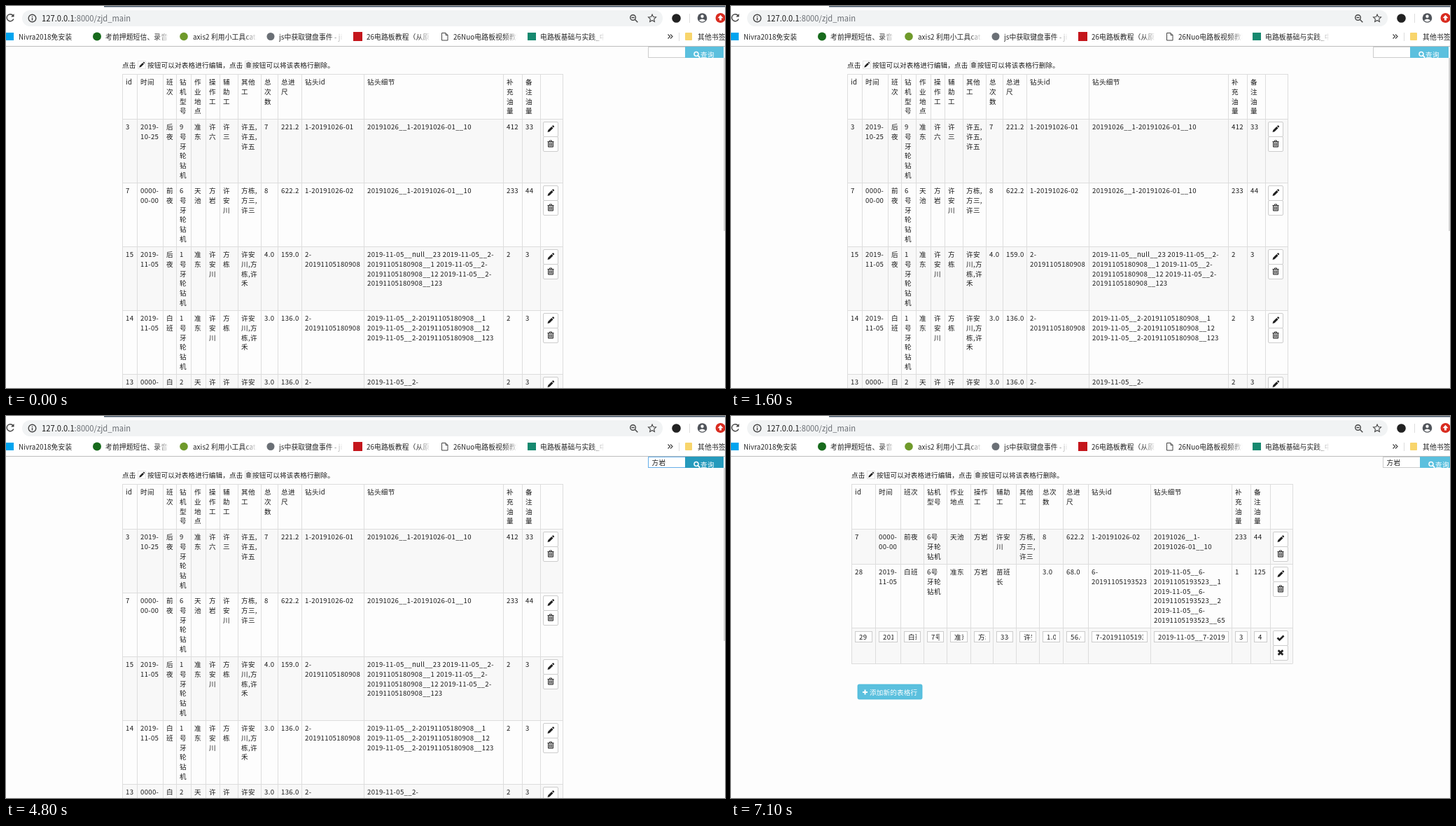
These frames come from a looping animation (1027x545 px, 8000 ms). An HTML page:

```html
<!DOCTYPE html>
<html lang="zh-CN">
<head>
<meta charset="utf-8">
<title>zjd_main</title>
<style>
html, body { margin: 0; width: 100%; height: 100%; overflow: hidden; background: #fdfdfd; }
svg { display: block; }
#stage { position: absolute; left: 0; top: 0; }
text {
  font: 9.6px "Noto Sans CJK SC", "Noto Sans CJK", "Noto Sans", sans-serif;
  letter-spacing: .33px; fill: #1a1a1a; white-space: pre;
}
.url { font-size: 11.2px; letter-spacing: 0; }
.mark { font-size: 9.8px; letter-spacing: .1px; fill: #222; }
.hint { letter-spacing: .15px; }
.white, .white tspan { fill: #fff; }
.dim { fill: #6b6f74; }
.ime { fill: #1a6fc0; }
.line { fill: none; stroke: #444; stroke-width: 1.4; }
.grid { fill: none; stroke: #ddd; }
.box { fill: #fff; stroke: #ccc; }
</style>
</head>
<body>
<svg id="stage" width="1027" height="545" viewBox="0 0 1027 545"></svg>
<script>
const LOOP = 8000, LH = 13.75;
let css = '', count = 0;

// Group that is visible only in the given [from, to) spans, in ms.
function during(spans, body) {
  const name = 'k' + count++;
  const at = (ms, on) => `${ms / LOOP * 100}%{visibility:${on ? 'visible' : 'hidden'}}`;
  let keys = spans[0][0] > 0 ? at(0, false) : '';
  for (const [from, to] of spans) keys += at(from, true) + at(to, to === LOOP);
  css += `@keyframes ${name}{${keys}}.${name}{animation:${name} ${LOOP}ms step-end infinite}`;
  return `<g class="${name}">${body}</g>`;
}

const rect = (x, y, w, h, attrs) => `<rect x="${x}" y="${y}" width="${w}" height="${h}" ${attrs}/>`;
const disc = (x, y, r, attrs) => `<circle cx="${x}" cy="${y}" r="${r}" ${attrs}/>`;
const path = (d, attrs) => `<path d="${d}" ${attrs}/>`;
const text = (x, y, s, cls = '') => `<text x="${x}" y="${y}" class="${cls}">${s}</text>`;
const move = (x, y, body, scale = 1) => `<g transform="translate(${x} ${y}) scale(${scale})">${body}</g>`;
const lines = (x, y, s) => s.split('|').map((t, i) => t && text(x, y + i * LH, t)).join('');

const pencil = (x, y, scale = .9) => move(x, y,
  path('M-5 5l.9-3.3 5.6-5.6 2.4 2.4-5.6 5.6zM2.2-4.5l1-1q.7-.5 1.3 0l1 1q.5.7 0 1.3l-1 1z', 'fill="#222"'), scale);
const trash = (x, y, scale = 1) => move(x, y,
  path('M-3.5-3h7v8h-7z', 'fill="#bbb"') +
  path('M-4.5-3h9M-1.5-3v-1.6h3V-3M-3.5-3v7.5h7V-3M-1.2-1v4M1.2-1v4', 'fill="none" stroke="#333"'), scale);
const tick = (x, y) => move(x, y, path('M-4.5 0l3 3 6-6', 'fill="none" stroke="#222" stroke-width="2.6"'));
const cross = (x, y) => move(x, y, path('M-3.3-3.3l6.6 6.6M3.3-3.3l-6.6 6.6', 'stroke="#222" stroke-width="2.8"'));
const lens = (x, y, color) => move(x, y,
  disc(-1, -1, 3, `fill="none" stroke="${color}" stroke-width="1.5"`) +
  path('M1.2 1.2l3 3', `stroke="${color}" stroke-width="1.8"`));

function button(x, y, icon, fill = '#fff', stroke = '#ccc') {
  return rect(x + .5, y + .5, 21, 21, `fill="${fill}" stroke="${stroke}" rx="1.5"`) + icon(x + 11, y + 10.5);
}

// rows: [top, cells]; the first row is the header.
function table(cols, rows, bottom) {
  const left = cols[0], right = cols[cols.length - 1];
  let fills = '', grid = '', words = '', tools = '';
  rows.forEach(([top, cells], i) => {
    const end = i + 1 < rows.length ? rows[i + 1][0] : bottom;
    if (i % 2) fills += rect(left, top, right - left, end - top, 'fill="#f8f8f8"');
    grid += `M${left} ${top + .5}H${right + .5}`;
    cells.forEach((s, c) => words += lines(cols[c] + 5, top + 15, s));
    if (i && cells.length) {
      const x = cols[14] + 4;
      tools += button(x, top + 4, pencil) + button(x, top + 25, trash);
    }
  });
  grid += `M${left} ${bottom + .5}H${right + .5}`;
  for (const x of cols) grid += `M${x + .5} ${rows[0][0]}V${bottom}`;
  return fills + path(grid, 'class="grid"') + words + tools;
}

const hint = x => move(x, 0,
  text(0, 88, '点击', 'hint') + rect(22.5, 78.5, 11, 11, 'fill="none" stroke="#e4e4e4"') + pencil(28, 84, .75) +
  text(36, 88, '按钮可以对表格进行编辑，点击', 'hint') + rect(175.5, 78.5, 10, 11, 'fill="none" stroke="#ddd"') +
  trash(180.5, 84, .75) + text(186, 88, '按钮可以将该表格行删除。', 'hint'));

const addRow = y => rect(181, y, 92, 21, 'fill="#5bc0de" stroke="#46b8da" stroke-width=".8" rx="2"') +
  path(`M188 ${y + 11}h7m-3.5-3.5v7`, 'stroke="#fff" stroke-width="2"') +
  text(198, y + 14.5, '添加新的表格行', 'hint white');

const field = x => rect(x + .5, 58.5, 53, 15, 'class="box"');
const query = (x, color) => rect(x, 58, 55, 16, `fill="${color}"`) +
  lens(x + 17, 69.5, '#fff') + text(x + 22, 73, '查询', 'white');

// Table content
const user = '方岩', chief = '许安川';
const down = s => [...s].join('|');
const heads = ['id', '时间', '班次', '钻机型号', '作业地点', '操作工', '辅助工', '其他工',
  '总次数', '总进尺', '钻头id', '钻头细节', '补充油量', '备注油量'];
const tall = heads.map((h, i) => [2, 3, 4, 5, 6, 8, 12, 13].includes(i) ? down(h) :
  i === 7 || i === 9 ? h.slice(0, 2) + '|' + h[2] : h);
const wide = heads.map((h, i) => i < 3 || i === 10 || i === 11 ? h :
  i > 11 ? down(h) : h.slice(0, 2) + '|' + h.slice(2));
const day = '2019-|11-05', noDay = '0000-|00-00', bit = '2-|20191105180908';
const crew = '许安|川,方|栋,许|禾', trio = '方栋,|方三,|许三';
const drill = n => n + '|号|牙|轮|钻|机', rig = n => n + '号|牙|轮|钻|机', rig3 = n => n + '号|牙轮|钻机';
const shot = '20191026__1-20191026-01__10', head = '2019-11-05__2-', tail = '20191105180908__';
const six = '2019-11-05__6-', sixTail = '20191105193523__';

const fullTable = table(
  [166, 187, 224, 243, 264, 285, 305, 331, 364, 388, 422, 511, 710, 737, 763, 795],
  [[97, tall],
   [161, ['3', '2019-|10-25', '后|夜', drill(9), '准|东', '许|六', '许|三', '许五,|许五,|许五', '7', '221.2', '1-20191026-01', shot, '412', '33']],
   [252, ['7', noDay, '前|夜', drill(6), '天|池', down(user), down(chief), trio, '8', '622.2', '1-20191026-02', shot, '233', '44']],
   [343, ['15', day, '后|夜', drill(1), '准|东', down(chief), '方|栋', crew, '4.0', '159.0', bit,
     `2019-11-05__null__23 ${head}|${tail}1 ${head}|${tail}12 ${head}|${tail}123`, '2', '3']],
   [434, ['14', day, '白|班', drill(1), '准|东', down(chief), '方|栋', crew, '3.0', '136.0', bit,
     `${head}${tail}1|${head}${tail}12|${head}${tail}123`, '2', '3']],
   [525, ['13', noDay, '白|班', drill(2), '天|池', down(chief), down(chief), crew, '3.0', '136.0', bit, `${head}|${tail}1`, '2', '3']]],
  616);

const emptyTable = table(
  [172, 195, 228, 261, 314, 367, 410, 453, 496, 539, 582, 628, 681, 734, 787, 802], [[97, heads]], 119);

const foundTable = table(
  [172, 194, 230, 249, 276, 299, 319, 345, 381, 404, 439, 528, 717, 743, 770, 802],
  [[97, tall],
   [161, ['7', noDay, '前|夜', rig(6), '天|池', down(user), down(chief), trio, '8', '622.2', '1-20191026-02', shot, '233', '44']],
   [238, ['28', day, '白|班', rig(6), '准|东', down(user), '苗|班|长', '', '3.0', '68.0', '6-|20191105193523',
     `${six}${sixTail}1|${six}${sixTail}2|${six}${sixTail}65`, '1', '125']],
   [316, ['29', day, '白|班', rig(7), '准|东', down(user), '334', crew, '1.0', '56.0', '7-|20191105193640', '2019-11-05__7-20191105193640__56', '3', '4']]],
  393);

const editCols = [172, 206, 242, 275, 308, 342, 374, 407, 440, 474, 510, 599, 715, 742, 770, 802];
const editTable = table(editCols,
  [[97, wide],
   [161, ['7', noDay, '前夜', rig3(6), '天池', user, '许安|川', trio, '8', '622.2', '1-20191026-02', '20191026__1-|20191026-01__10', '233', '44']],
   [211, ['28', day, '白班', rig3(6), '准东', user, '苗班|长', '', '3.0', '68.0', '6-|20191105193523',
     ['1', '2', '65'].map(n => `${six}|${sixTail}${n}`).join('|'), '1', '125']],
   [302, []]], 353);
const editFields = ['29', '2019-11-05', '白班', '7号牙轮钻机', '准东', user, '334', chief + ',方栋,许禾', '1.0', '56.0',
  '7-20191105193640', '2019-11-05__7-20191105193640__56', '3', '4'].map((s, i) => {
    const x = editCols[i] + 5, w = editCols[i + 1] - x - 5;
    return rect(x + .5, 307.5, w, 15, 'class="box"') +
      `<svg x="${x + 6}" y="307" width="${w - 11}" height="16">${text(0, 11.5, s)}</svg>`;
  }).join('');

// Browser bars
const urlText = (host, rest) =>
  `<text x="51" y="22" class="url ${host}">127.0.0.1<tspan class="${rest}">:8000/zjd_main</tspan></text>`;
const marks = [
  [18, 'Nivra2018免安装'], [142, '考前押题短信、录音'], [267, 'axis2 利用小工具cat.'], [390, 'js中获取键盘事件 - ji'],
  [515, '26电路板教程（从原'], [639, '26Nuo电路板视频教程'], [763, '电路板基础与实践_中']
].map(([x, s]) => `<svg x="${x}" y="34" width="93" height="20">${text(0, 13.5, s, 'mark')}</svg>` +
  rect(x + 72, 35, 22, 18, 'fill="url(#fade)"')).join('');

const bars = rect(0, 0, 1027, 57, 'fill="#fff"') + rect(140, 0, 887, 1.5, 'fill="#4a5a6c"') +
  rect(0, 57, 1027, 1, 'fill="#bdbdbd"') +
  path('M10 13.5a5 5 0 1 0 .8 5', 'class="line"') + path('M11.5 11v4.5h-4.5z', 'fill="#444"') +
  rect(23, 6, 915, 23, 'rx="11.5" fill="#f1f3f4"') +
  during([[500, 700]], rect(23, 6, 915, 23, 'rx="11.5" fill="#eceef0"')) +
  during([[700, 1400]], rect(23.5, 6.5, 913, 22.5, 'rx="11" fill="#fff" stroke="#a3c6ee" stroke-width="1.4"') +
    rect(51, 9, 128, 18, 'fill="#3390ec"') + urlText('white', 'white')) +
  during([[0, 700], [1400, LOOP]], urlText('', 'dim')) +
  disc(37.5, 17.5, 5.3, 'class="line"') + path('M37.5 16.7v3.8m0-6v1.3', 'class="line"') +
  disc(895.5, 16.5, 3.8, 'class="line"') + path('M898.3 19.3l4 4m-8.8-6.8h4', 'class="line"') +
  path('M923 12l1.6 3.6 3.9.4-2.9 2.6.8 3.9-3.4-2-3.4 2 .8-3.9-2.9-2.6 3.9-.4z', 'class="line" style="stroke-width:1.1"') +
  disc(957.5, 17.5, 6.3, 'fill="#222"') + rect(976, 11, 1, 13, 'fill="#ddd"') +
  disc(994.5, 17, 6.8, 'fill="#50545a"') + disc(994.5, 14.8, 2.2, 'fill="#fff"') +
  path('M990 20.6q4.5-4 9 0q-4.5 4-9 0z', 'fill="#fff"') +
  disc(1020.5, 17, 7, 'fill="#d92b1f"') + path('M1020.5 12.8l4 4.4h-2.5v3.3h-3v-3.3h-2.5z', 'fill="#fff"') +
  rect(0, 38, 11, 11, 'fill="#00a4ef"') + disc(130, 43.5, 6, 'fill="#176a1c"') +
  disc(254, 43.5, 5.8, 'fill="#6f9a2b"') + disc(378, 43.5, 5.5, 'fill="#6a6f75"') +
  rect(496, 37, 13, 13, 'fill="#c4161c"') +
  path('M622.5 38.5h5.5l3 3v7.5h-8.5zM628 38.5v3h3', 'class="line" style="stroke-width:1"') +
  rect(745, 38, 12, 11, 'fill="#16896f"') +
  during([[100, 200]], rect(966, 34, 70, 20, 'rx="10" fill="#e8eaed"')) + marks +
  during([[200, 300]], rect(491, 34, 116, 20, 'rx="10" fill="#5f6368" fill-opacity=".12"')) +
  path('M945.5 40.5l3 3-3 3m3.5-6l3 3-3 3', 'class="line" style="stroke-width:1.2"') +
  rect(961, 38, 1, 12, 'fill="#ddd"') +
  rect(970, 38, 10, 11, 'fill="#f8d56c" rx="1"') + text(988, 47.5, '其他书签', 'mark');

// Input method: status strip and candidate window
const strip = rect(886, 420.5, 150, 18.5, 'fill="#fff" stroke="#b7d3ec"') +
  rect(873, 420, 18.5, 18.5, 'rx="2" fill="#e8521f" transform="rotate(-8 882 429)"') +
  `<text x="898" y="434" class="ime" style="font-size:12px;font-weight:bold">中</text>` +
  disc(919.5, 428, 1.5, 'fill="none" stroke="#1a6fc0"') + path('M925.5 429.5q1.5 2-1 4', 'fill="none" stroke="#1a6fc0" stroke-width="1.8"') +
  disc(940, 430, 5.6, 'fill="none" stroke="#1a6fc0" stroke-width="1.4"') +
  path('M937 431.5q3 3.5 6 0M938 427.5v1.5m4-1.5v1.5', 'fill="none" stroke="#1a6fc0" stroke-width="1.2"') +
  rect(955.5, 423.5, 4.5, 8, 'rx="2.2" fill="#1a6fc0"') +
  path('M953.5 429q0 4.5 4.2 4.5t4.2-4.5M957.7 433.5v3', 'fill="none" stroke="#1a6fc0" stroke-width="1.2"') +
  rect(969, 425, 13, 9.5, 'rx="1" fill="#1a6fc0"') +
  path('M971 427.7h9m-9 2.3h9m-7 2.4h5', 'stroke="#fff" stroke-dasharray="1.5 1"') +
  disc(993, 427, 2.7, 'fill="#a9b7c6"') + path('M988 435q0-5 5-5t5 5z', 'fill="#a9b7c6"') + disc(998, 433, 2.3, 'fill="#c8d3de"') +
  path('M1009 425l2 1.3 2-1.3 4 2.5-1.4 2.6-1.6-.7v6h-6v-6l-1.6.7-1.4-2.6z', 'fill="#1a6fc0"') +
  path('M1023 435l5-7', 'stroke="#1a6fc0" stroke-width="2.4"');

const guesses = ['1.方 2.放 3.房 4.发 5.非', '1.反 2.饭 3.翻 4.番 5.犯', '1.方 2.放 3.房 4.防 5.仿',
  '1.方圆 2.放养 3.方 4.放 5.房', '1.方亚 2.防雅 3.方 4.放 5.房', `1.${user} 2.方言 3.放眼 4.方 5.放`];
const typing = ['f', 'fan', 'fang', "fang'y", "fang'ya", "fang'yan"].map((s, i) =>
  during([[3400 + i * 100, 3500 + i * 100]],
    rect(715.5, 80.5, 320, 38, 'fill="#f4faff" stroke="#a9cdea"') + rect(722, 99, 305, 1, 'fill="#d5e6f4"') +
    `<text x="724" y="94" style="font-size:12px">${s}</text>` +
    `<text x="724" y="113" style="font-size:12px;fill:#1a6fc0">${guesses[i]}</text>`)).join('');

const caret = x => rect(x, 61, 1, 11, 'fill="#222"');
const defs = `<defs><linearGradient id="fade"><stop stop-color="#fff" stop-opacity="0"/>
  <stop offset=".9" stop-color="#fff"/></linearGradient></defs>`;

const page =
  during([[0, 1400], [1600, 4900]], hint(166) + fullTable + field(917) + query(970, '#5bc0de') +
    rect(1025, 74, 2, 247, 'fill="#d8d8d8"')) +
  during([[3100, 4900]], rect(917.5, 58.5, 53, 15, 'fill="#fff" stroke="#66afe9"')) +
  during([[3100, 3400]], caret(923)) +
  during([[4000, 4900]], text(922.5, 70, user)) +
  during([[4000, 4400]], caret(943)) +
  during([[4400, 4700]], query(970, '#31b0d5')) +
  during([[4700, 4900]], query(970, '#269abc')) +
  during([[1500, 1600], [4900, LOOP]], hint(172) + field(931) + query(984, '#5bc0de')) +
  during([[4900, LOOP]], text(936.5, 70, user)) +
  during([[4900, 6900]], query(984, '#31b0d5')) +
  during([[1500, 1600], [4900, 5000]], emptyTable + addRow(149)) +
  during([[5000, 7000]], foundTable + addRow(423)) +
  during([[6200, 6900]], button(774, 320, pencil, '#e6e6e6', '#adadad')) +
  during([[6900, 7000]], button(774, 320, pencil, '#d4d4d4', '#8c8c8c')) +
  during([[7000, LOOP]], editTable + editFields + button(774, 306, tick) + button(774, 327, cross) + addRow(383)) +
  during([[700, 1400], [3100, 4700]], strip) + typing;

document.getElementById('stage').innerHTML = defs + page + bars;
const style = document.createElement('style');
style.textContent = css;
document.head.append(style);
</script>
</body>
</html>
```
